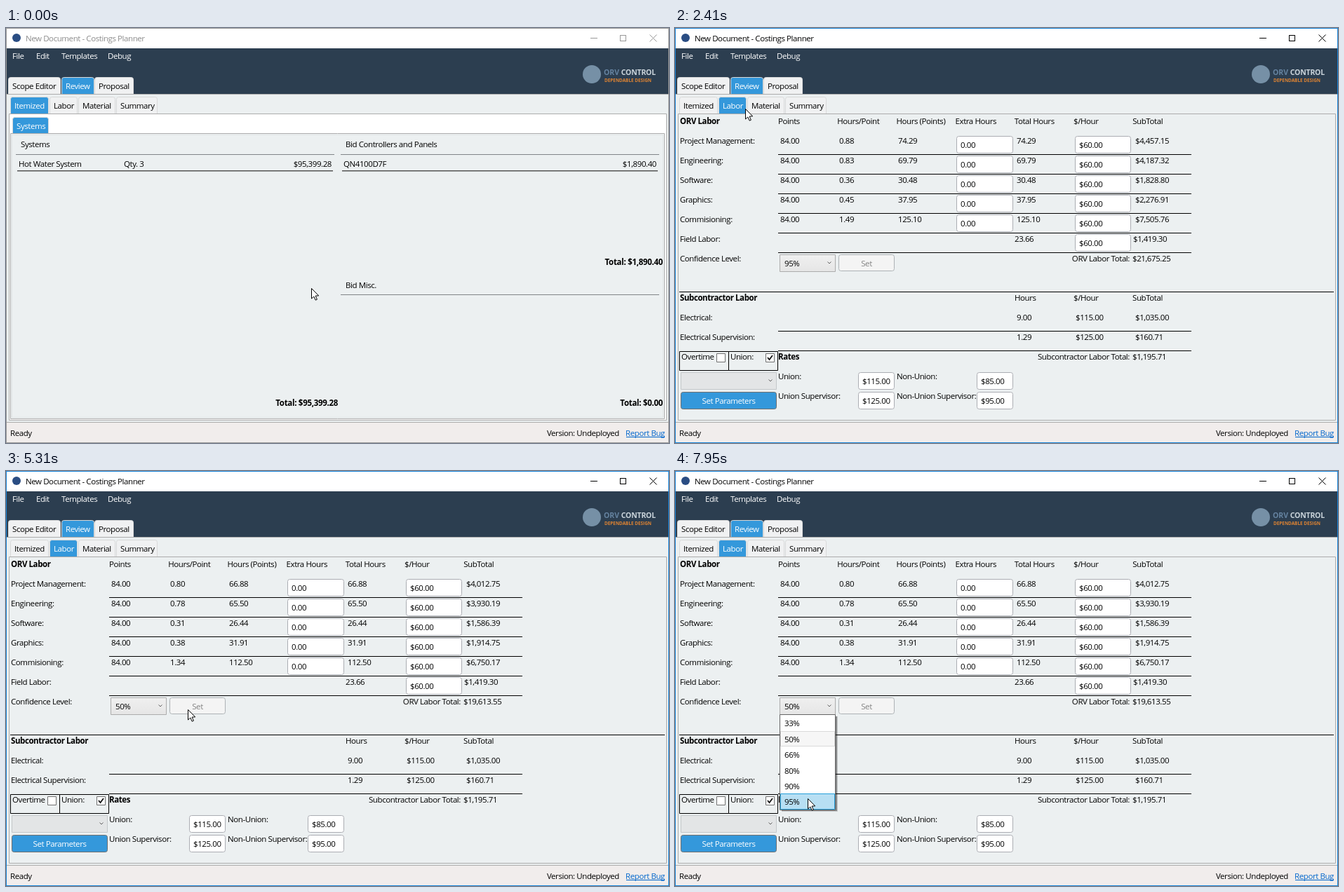
These frames come from a looping animation (945 by 592 pixels, 8 s). An HTML page with a canvas:

```html
<!DOCTYPE html>
<html lang="en">
<head>
<meta charset="utf-8">
<title>Costings Planner</title>
<style>
html, body { margin: 0; width: 100%; height: 100%; overflow: hidden; background: #ecf0f1; }
canvas { display: block; }
</style>
</head>
<body>
<canvas id="stage" width="945" height="592"></canvas>
<script>
const ctx = document.getElementById('stage').getContext('2d');
const LOOP = 8000;
const BG = '#ecf0f1', BLUE = '#3498db', NAVY = '#2c3e50', EDGE = '#abadb3';
const FRAME = '#acacac', BUTTON_EDGE = '#707070';
const LEVELS = ['33%', '50%', '66%', '80%', '90%', '95%'];
const LIST_TOP = 348.3, ITEM_H = 22.4;

// Pointer keys: time, x, y
const PATH = [
  [450, 435, 371], [700, 245, 232], [950, 42, 80], [1060, 58, 95], [1250, 74, 106],
  [2360, 74, 106], [2410, 100, 114], [2650, 190, 240], [2850, 253, 333], [3040, 211, 328],
  [3600, 211, 328], [3970, 196, 385], [4470, 196, 385], [4520, 202, 381],
  [4790, 202, 381], [5070, 259, 340], [5870, 259, 340], [6320, 208, 334],
  [6650, 208, 334], [6780, 187, 359], [7000, 185, 374], [7480, 190, 441],
  [7540, 190, 443], [7950, 189, 467]
];

// Label, hours per point, hours, subtotal
const ROWS = {
  '95%': [
    ['Project Management:', '0.88', '74.29', '$4,457.15'],
    ['Engineering:', '0.83', '69.79', '$4,187.32'],
    ['Software:', '0.36', '30.48', '$1,828.80'],
    ['Graphics:', '0.45', '37.95', '$2,276.91'],
    ['Commisioning:', '1.49', '125.10', '$7,505.76']
  ],
  '50%': [
    ['Project Management:', '0.80', '66.88', '$4,012.75'],
    ['Engineering:', '0.78', '65.50', '$3,930.19'],
    ['Software:', '0.31', '26.44', '$1,586.39'],
    ['Graphics:', '0.38', '31.91', '$1,914.75'],
    ['Commisioning:', '1.34', '112.50', '$6,750.17']
  ]
};
const TOTALS = { '95%': '$21,675.25', '50%': '$19,613.55' };

function fill(x, y, w, h, color) {
  ctx.fillStyle = color;
  ctx.fillRect(x, y, w, h);
}

function box(x, y, w, h, color, edge, radius = 0) {
  ctx.beginPath();
  ctx.roundRect(x + .5, y + .5, w - 1, h - 1, radius);
  ctx.fillStyle = color;
  ctx.fill();
  ctx.lineWidth = 1;
  ctx.strokeStyle = edge;
  ctx.stroke();
}

// Text on a line whose capitals are centred at y
function text(s, x, y, { color = '#000', align = 'left', bold = false, size = 11.5, gap = -.42 } = {}) {
  ctx.font = `${bold ? 'bold ' : ''}${size}px "Open Sans", "Noto Sans", sans-serif`;
  ctx.letterSpacing = gap + 'px';
  ctx.textAlign = align;
  ctx.fillStyle = color;
  ctx.fillText(s, x, y + 4);
}

function stroke(points, color, width = 1) {
  ctx.beginPath();
  points.forEach(([x, y]) => ctx.lineTo(x, y));
  ctx.strokeStyle = color;
  ctx.lineWidth = width;
  ctx.stroke();
}

function dot(x, y, r, color) {
  ctx.beginPath();
  ctx.arc(x, y, r, 0, 7);
  ctx.fillStyle = color;
  ctx.fill();
}

function shade(y, h, top, bottom) {
  const g = ctx.createLinearGradient(0, y, 0, y + h);
  g.addColorStop(0, top);
  g.addColorStop(1, bottom);
  return g;
}

function tab(label, x, y, w, h, on, edge = '#d9d9d9') {
  box(x, y, w, h + 4, on ? BLUE : '#f0f1f2', edge, [3, 3, 0, 0]);
  text(label, x + 6, y + 13, { color: on ? '#fff' : '#000' });
}

function field(s, x, y, w) {
  box(x, y, w, 25, '#fff', EDGE, 3);
  text(s, x + 6, y + 13);
}

function chevron(x, y) {
  stroke([[x - 2.5, y - 1.5], [x, y + 1], [x + 2.5, y - 1.5]], '#606060');
}

function pointerAt(t) {
  let a = PATH[0];
  for (const b of PATH) {
    if (t < b[0]) {
      const k = b === a ? 0 : (t - a[0]) / (b[0] - a[0]);
      return [1, 2].map(i => Math.round(a[i] + (b[i] - a[i]) * k));
    }
    a = b;
  }
  return [a[1], a[2]];
}

function drawPointer(x, y) {
  const shape = [[0, 0], [0, 14.5], [3.3, 11.5], [5.7, 16.7], [7.9, 15.7], [5.6, 10.6], [10.2, 10.4]];
  ctx.beginPath();
  shape.forEach(([dx, dy]) => ctx.lineTo(x + .5 + dx, y + .5 + dy));
  ctx.closePath();
  ctx.fillStyle = '#fff';
  ctx.fill();
  ctx.lineWidth = 1;
  ctx.strokeStyle = '#000';
  ctx.stroke();
}

function drawWindow(active, labor) {
  const ink = active ? '#000' : '#999';
  fill(0, 0, 945, 592, BG);
  fill(0, 0, 945, 29, '#fff');
  dot(15, 14, 6, '#2a4d83');
  text('New Document - Costings Planner', 28, 15, { color: active ? '#000' : '#8c8c8c' });
  fill(833, 14, 10, 1, ink);
  ctx.lineWidth = 1;
  ctx.strokeStyle = ink;
  ctx.strokeRect(875.5, 10.5, 8, 8);
  stroke([[917.5, 9.5], [927.5, 19.5]], ink);
  stroke([[927.5, 9.5], [917.5, 19.5]], ink);

  fill(0, 29, 945, 65, NAVY);
  [['File', 9], ['Edit', 43], ['Templates', 79], ['Debug', 145]]
    .forEach(([s, x]) => text(s, x, 40, { color: '#fff' }));
  dot(835, 66, 13, '#7690a6');
  text('ORV', 852, 63, { color: '#6583a0', bold: true, size: 10.5, gap: 0 });
  text('CONTROL', 926, 63, { color: '#c9d3da', bold: true, align: 'right', size: 10.5, gap: -.2 });
  text('DEPENDABLE DESIGN', 853, 73, { color: '#e08432', bold: true, size: 6.4, gap: 0 });

  tab('Scope Editor', 3, 70, 75, 24, false);
  tab('Proposal', 126, 70, 56, 24, false);
  tab('Review', 79, 70, 47, 24, true);
  fill(1, 94, 943, 469, BG);
  fill(1, 94, 943, 1, FRAME);

  const tabs = [['Itemized', 6, 55], ['Labor', 62, 40], ['Material', 103, 53], ['Summary', 157, 59]];
  tabs.forEach(([s, x, w], i) => tab(s, x, 98, w, 24, i === +labor));
  box(4, 122, 938, 438, BG, FRAME);

  fill(1, 562, 943, 1, FRAME);
  fill(1, 563, 943, 29, '#f1edec');
  text('Ready', 6, 578);
  text('Version: Undeployed', 874, 578, { align: 'right' });
  text('Report Bug', 939, 578, { color: '#0066cc', align: 'right' });
  fill(884, 583, 55, 1, '#0066cc');
}

function drawItemized() {
  const right = { align: 'right' }, total = { align: 'right', bold: true, gap: -.3 };
  fill(5, 123, 936, 436, '#fff');
  tab('Systems', 9, 127, 52, 23, true);
  box(6, 150, 933, 408, BG, FRAME);
  box(8, 152, 929, 404, BG, '#e2e6e7');

  text('Systems', 21, 166);
  fill(14, 180, 454, 1, '#808488');
  text('Hot Water System', 18, 194);
  text('Qty. 3', 168, 194);
  text('$95,399.28', 464, 194, right);
  fill(16, 203, 450, 1.5, '#555');

  text('Bid Controllers and Panels', 484, 166);
  fill(477, 180, 454, 1, '#808488');
  text('QN4100D7F', 481, 194);
  text('$1,890.40', 927, 194, right);
  fill(479, 203, 450, 1.5, '#555');
  text('Total: $1,890.40', 936, 334, total);

  text('Bid Misc.', 484, 367);
  fill(477, 380, 454, 1, '#808488');
  text('Total: $95,399.28', 473, 535, total);
  text('Total: $0.00', 936, 535, total);
}

function checkbox(x, y, checked) {
  box(x, y, 13, 13, '#fff', BUTTON_EDGE);
  if (checked) stroke([[x + 3, y + 6], [x + 5.5, y + 9], [x + 10, y + 3]], '#111', 1.8);
}

function drawLabor(level) {
  const bold = { bold: true }, right = { align: 'right' };
  text('ORV Labor', 7, 133, bold);
  ['Points', 'Hours/Point', 'Hours (Points)', 'Extra Hours', 'Total Hours', '$/Hour', 'SubTotal']
    .forEach((s, i) => text(s, 147 + 84.2 * i, 133));

  ROWS[level].forEach(([label, rate, hours, cost], i) => {
    const y = 161 + 28 * i;
    text(label, 7, y);
    text('84.00', 150, y);
    text(rate, 234, y);
    text(hours, 318, y);
    field('0.00', 401, y - 7, 81);
    text(hours, 487, y);
    text(cost, 656, y);
  });
  for (let i = 0; i < 6; i++) {
    field('$60.00', 570, 154 + 28 * i, 80);
    fill(147, 180 + 28 * i, 589, 1, '#000');
  }
  text('Field Labor:', 7, 301);
  text('23.66', 484, 301);
  text('$1,419.30', 653, 301);
  text('Confidence Level:', 7, 329);
  text('ORV Labor Total:', 648, 329, right);
  text(TOTALS[level], 652, 329);

  fill(6, 376, 933, 1, '#000');
  text('Subcontractor Labor', 7, 385, bold);
  text('Hours', 484, 385);
  text('$/Hour', 568, 385);
  text('SubTotal', 652, 385);
  [['Electrical:', '9.00', '$115.00', '$1,035.00'],
   ['Electrical Supervision:', '1.29', '$125.00', '$160.71']].forEach((row, i) => {
    row.forEach((s, j) => text(s, [7, 487, 571, 656][j], 413 + 28 * i));
    fill(147, 432 + 28 * i, 589, 1, '#000');
  });
  text('Subcontractor Labor Total:', 648, 469, right);
  text('$1,195.71', 652, 469);

  box(6, 461, 71, 28, BG, '#000');
  box(76, 461, 71, 28, BG, '#000');
  text('Overtime', 9, 469);
  text('Union:', 79, 469);
  checkbox(59, 464, false);
  checkbox(129, 464, true);
  text('Rates', 147, 469, bold);

  box(8, 491, 137, 25, '#e3e5e6', '#c4c8ca');
  chevron(136, 503);
  box(8, 519, 137, 25, BLUE, BUTTON_EDGE, 3);
  text('Set Parameters', 76.5, 532, { color: '#fff', align: 'center' });

  [['Union:', '$115.00', 'Non-Union:', '$85.00'],
   ['Union Supervisor:', '$125.00', 'Non-Union Supervisor:', '$95.00']].forEach(([a, b, c, d], i) => {
    const y = 497 + 28 * i;
    text(a, 147, y);
    field(b, 261, y - 6, 52);
    text(c, 316, y);
    field(d, 430, y - 6, 52);
  });
}

function drawCombo(value, hover) {
  const [top, bottom, edge] = hover ? ['#ecf4fc', '#dcecfc', '#7eb4ea'] : ['#f0f0f0', '#e5e5e5', FRAME];
  box(149, 323, 80, 25, shade(323, 25, top, bottom), edge);
  text(value, 156, 336);
  chevron(220, 335);
}

function drawSet(enabled, hover, pressed) {
  const [color, edge] = !enabled ? ['#f4f4f4', '#adb2b5']
    : pressed ? ['#c4e5f6', '#2c628b']
    : hover ? ['#bee6fd', '#3c7fb1'] : [BLUE, BUTTON_EDGE];
  box(233, 323, 80, 24, color, edge, 3);
  text('Set', 273, 336, { color: enabled ? '#fff' : '#838383', align: 'center' });
}

// Drop-down list sliding out from under the combo box
function drawList(selected, py, shown) {
  const height = 136, hovered = Math.floor((py - LIST_TOP) / ITEM_H);
  const edgeOf = i => Math.round(LIST_TOP + ITEM_H * i);
  ctx.save();
  ctx.beginPath();
  ctx.rect(148, 347, 90, (height + 4) * shown);
  ctx.clip();
  ctx.translate(0, -(height + 4) * (1 - shown));
  fill(152, 350, 80, 136, 'rgba(0,0,0,.14)');
  fill(152, 350, 79, 135, 'rgba(0,0,0,.34)');
  box(149, 347, 80, 137, '#fff', '#646464');
  LEVELS.forEach((s, i) => {
    const y = edgeOf(i), h = edgeOf(i + 1) - y;
    if (i === hovered) box(150, y, 78, h, '#b7dff3', '#26a0da');
    else if (s === selected) {
      if (hovered < 0) box(150, y, 78, h, '#cae8f6', '#26a0da');
      else box(150, y, 78, h, '#f6f6f6', '#dadada');
    }
    text(s, 156, y + 12);
  });
  ctx.restore();
}

function slide(t, start, length) {
  return Math.min(1, .25 + .75 * (t - start) / length);
}

function draw(t) {
  const active = t >= 1400, labor = t >= 1490;
  const [px, py] = pointerAt(t);
  drawWindow(active, labor);
  if (labor) {
    const value = t < 4290 ? '95%' : '50%';
    const inRow = py >= 323 && py < 348;
    drawLabor(t < 5310 ? '95%' : '50%');
    drawCombo(value, inRow && px >= 149 && px < 229);
    drawSet(t >= 4290 && t < 5310, inRow && px >= 233 && px < 313, t >= 5220);
    if (t >= 3310 && t < 4290) drawList(value, py, slide(t, 3310, 190));
    if (t >= 6470) drawList(value, py, slide(t, 6470, 80));
  } else {
    drawItemized();
  }
  ctx.lineWidth = 1;
  ctx.strokeStyle = active ? '#1883d7' : '#999';
  ctx.strokeRect(.5, .5, 944, 591);
  drawPointer(px, py);
}

function tick() {
  draw(performance.now() % LOOP);
  requestAnimationFrame(tick);
}
tick();
</script>
</body>
</html>
```
